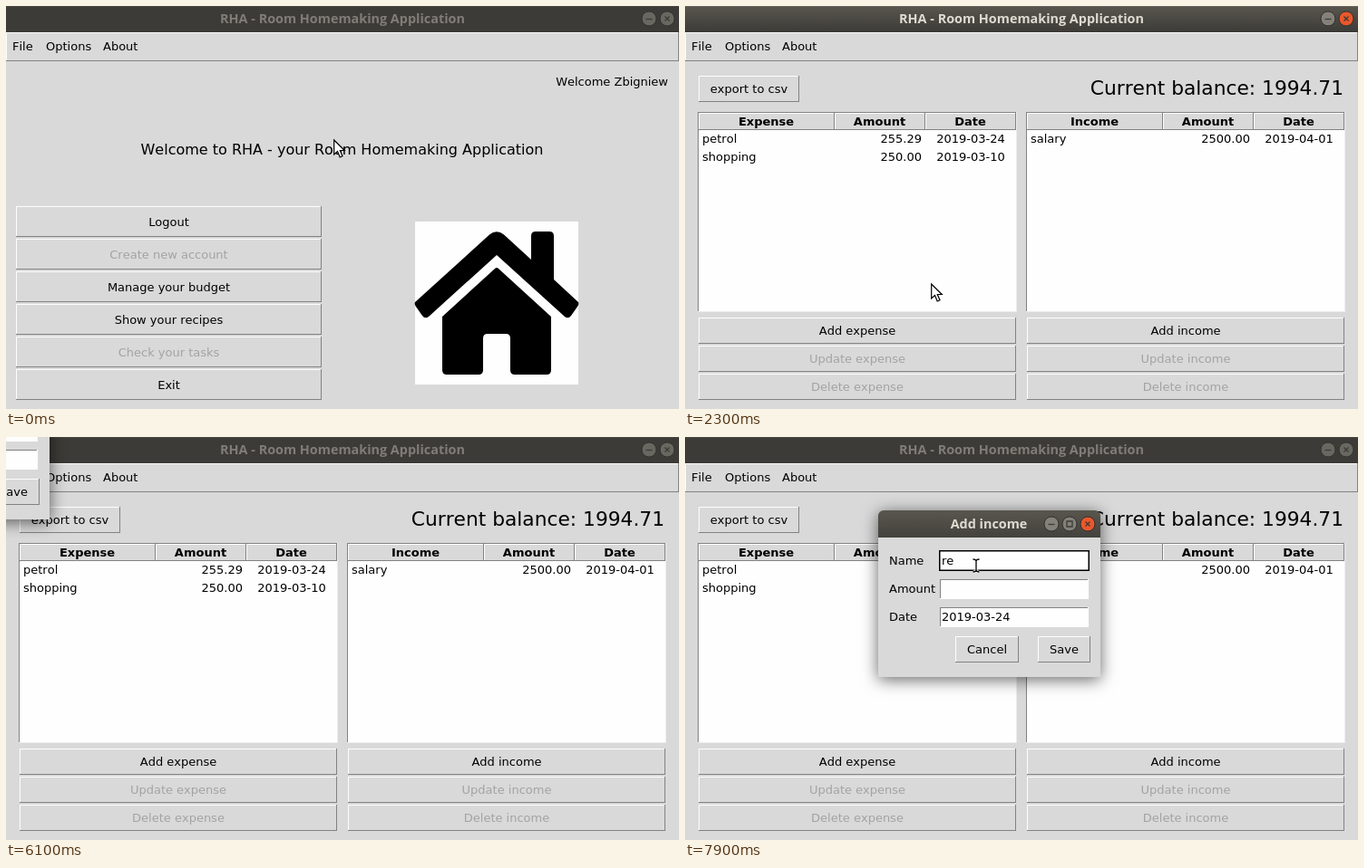
These frames come from a looping animation (742 by 445 pixels, 8 s). An HTML page:

```html
<!DOCTYPE html>
<html lang="en">
<head>
<meta charset="utf-8">
<title>RHA</title>
<style>
  html, body { margin: 0; width: 742px; height: 445px; overflow: hidden; background: #d9d9d9 }
  svg { display: block }
  text { font: 13px "DejaVu Sans", sans-serif; font-kerning: none; white-space: pre }
  .bold { font-weight: bold }
  .off { fill: #a3a3a3 }
  .lead { font-size: 16px }
  .big { font-size: 21.75px }
  .title { font: bold 14.4px "Open Sans", sans-serif }
  #dialog { filter: drop-shadow(0 3px 9px rgba(0, 0, 0, .6)) }
</style>
</head>
<body>
<svg id="stage" width="742" height="445" viewBox="0 0 742 445"></svg>
<script>
const NAME = 'RHA - Room Homemaking Application';
const BG = '#d9d9d9', DARK = '#828282', WHITE = '#fffeff';

const rect = (x, y, w, h, fill, extra = '') =>
  `<rect x="${x}" y="${y}" width="${w}" height="${h}" fill="${fill}" ${extra}/>`;

const text = (x, y, s, cls = '', anchor = 'start', extra = '') =>
  `<text x="${x}" y="${y}" class="${cls}" text-anchor="${anchor}" ${extra}>${s}</text>`;

// A box with one-pixel light and shade edges.
const bevel = (x, y, w, h, fill, light, shade, id = '') =>
  rect(x, y, w, h, shade) + rect(x, y, w - 1, h - 1, light) +
  rect(x + 1, y + 1, w - 2, h - 2, fill, id && `id="${id}"`);

const button = (x, y, w, h, label, { off = false, id = '' } = {}) =>
  bevel(x, y, w, h, BG, WHITE, DARK, id) +
  text(x + w / 2, y + Math.floor(h / 2) + 4.5, label, off ? 'off' : '', 'middle');

const entry = y => bevel(68, y, 164, 22, WHITE, DARK, WHITE);

function windowButton(x, y, kind, active) {
  const hot = active && kind === 'close';
  const glyph = {
    min: 'M-3.5 .5H3.5',
    max: 'M-3 -3H3V3H-3Z',
    close: 'M-2.5 -2.5L2.5 2.5M2.5 -2.5L-2.5 2.5'
  }[kind];
  return `<g transform="translate(${x} ${y})">
    <circle r="8" fill="${hot ? '#e9582c' : active ? '#83817a' : '#686760'}" stroke="#33322e"/>
    <path d="${glyph}" fill="none" stroke="#3c3b37" stroke-width="1.3"/></g>`;
}

const mainBar = active =>
  rect(0, 0, 742, 29, active ? 'url(#bar)' : '#3c3b37') +
  rect(0, 0, 742, 1, active ? '#66645c' : '#474641') +
  text(371, 19, NAME, 'title', 'middle', `fill="${active ? '#dfdbd2' : '#807d78'}"`) +
  windowButton(709, 14, 'min', active) + windowButton(729, 14, 'close', active);

function table(x, first, rows) {
  let out = bevel(x, 117, 352, 221, WHITE, DARK, '#ececec');
  let left = x + 1;
  [[150, first], [100, 'Amount'], [100, 'Date']].forEach(([w, label]) => {
    out += bevel(left, 118, w, 19, BG, WHITE, DARK) +
      text(left + w / 2 - .5, 132, label, 'bold', 'middle');
    left += w;
  });
  rows.forEach(([what, sum, date], i) => {
    const y = 151 + 20 * i;
    out += text(x + 5, y, what) + text(x + 247, y, sum, '', 'end') + text(x + 301, y, date, '', 'middle');
  });
  return out;
}

const actions = (x, kind) => ['Add', 'Update', 'Delete'].map((verb, i) =>
  button(x, 344 + 31 * i, 350, 29, `${verb} ${kind}`, { off: i > 0, id: i ? '' : `add-${kind}` })).join('');

const menuItems = [
  ['Logout', { id: 'logout' }], ['Create new account', { off: true }],
  ['Manage your budget', { id: 'budget' }], ['Show your recipes'],
  ['Check your tasks', { off: true }], ['Exit']
];

const house = `<g id="house">
  <path d="M451 327L533 252.5Q541 246 549 252.5L579 280V254Q579 249 584 249H599Q604 249 604 254V302L631 327
    Q632 329 630 332L623 342Q620 346 616 343L541 275L466 343Q462 346 459 342L452 332Q450 329 451 327Z"/>
  <path d="M539 290Q541 288 543 290L601 343V402Q601 407 596 407H561Q556 407 556 402V367Q556 362 551 362H531
    Q526 362 526 367V402Q526 407 521 407H486Q481 407 481 402V343Z"/></g>`;

const bag = `<g id="bag">
  <path d="M507 238H576Q585 240 580 249L564 273H518L502 249Q498 240 507 238Z"/>
  <path d="M518 283H564C597 302 631 342 631 382C631 407 614 418 594 418H488C468 418 451 407 451 382
    C451 342 485 302 518 283Z"/>
  <path d="M556 333C549 325 525 323 525 339C525 355 558 346 558 363C558 379 534 380 523 371
    M541 316V324M541 377V385" fill="none" stroke="${WHITE}" stroke-width="11" stroke-linecap="round"/>
  ${rect(551, 380, 80, 1, '#555')}</g>`;

const home = `<g id="home">
  ${text(730, 88, 'Welcome Zbigniew', '', 'end')}
  ${text(370.5, 164, 'Welcome to RHA - your Room Homemaking Application', 'lead', 'middle')}
  ${menuItems.map(([label, opt], i) => button(11, 221 + 36 * i, 337, 34, label, opt)).join('')}
  ${rect(451, 238, 180, 180, WHITE)}${house}${bag}</g>`;

const budgetView = `<g id="view">
  ${button(15, 77, 111, 29, 'export to csv')}
  ${text(726, 98, 'Current balance: 1994.71', 'big', 'end')}
  ${table(14, 'Expense', [['petrol', '255.29', '2019-03-24'], ['shopping', '250.00', '2019-03-10']])}
  ${table(376, 'Income', [['salary', '2500.00', '2019-04-01']])}
  ${actions(15, 'expense')}${actions(377, 'income')}</g>`;

const dialog = `<g id="dialog">
  ${rect(0, 0, 245, 40, 'url(#bar)', 'rx="6"')}${rect(0, 30, 245, 154, BG)}
  ${text(122, 20, 'Add income', 'title', 'middle', 'fill="#dfdbd2"')}
  ${['min', 'max', 'close'].map((kind, i) => windowButton(191 + 20 * i, 15, kind, true)).join('')}
  ${['Name', 'Amount', 'Date'].map((s, i) => text(12, 60 + 31 * i, s) + entry(45 + 31 * i)).join('')}
  ${text(70, 122, '2019-03-24')}
  <g id="focus">${rect(67, 44, 166, 23, '#000')}${rect(68.5, 45.5, 163, 20, WHITE)}</g>
  ${rect(69, 47, 2, 17, '#000', 'id="caret"')}
  ${text(70, 60, 're', '', 'start', 'id="typed"')}
  ${button(85, 139, 70, 29, 'Cancel')}${button(176, 139, 58, 29, 'Save')}</g>`;

const cursors = `
  <path id="arrow" d="M.7 1V17L4.5 13.5L7.2 20L10 18.8L7.3 12.5H12.3Z" fill="#fff" stroke="#000" stroke-width="1.2"/>
  <path id="hand" d="M-5 -4Q-5 -7 -2.5 -6Q-1 -8 1 -6Q3 -7 4 -5Q6.5 -5 6.5 -2V2L4.5 7H-3.5V4L-6.5 1Q-7 -2 -5 -1Z
    M-2.3 -5.5V-2M1 -5.5V-2M4 -4.5V-2" fill="#fff" stroke="#000" stroke-width="1.2"/>
  <g id="beam" fill="none">
    <path d="M-3.5 -7Q0 -7 0 -5V5Q0 7 -3.5 7M3.5 -7Q0 -7 0 -5V5Q0 7 3.5 7" stroke="#fff" stroke-width="3"/>
    <path d="M-3.5 -7Q0 -7 0 -5V5Q0 7 -3.5 7M3.5 -7Q0 -7 0 -5V5Q0 7 3.5 7" stroke="#000" stroke-width="1.3"/></g>`;

const $ = id => document.getElementById(id);
$('stage').innerHTML = `
  <defs><linearGradient id="bar" x2="0" y2="1">
    <stop stop-color="#59564e"/><stop offset="1" stop-color="#3c3b37"/></linearGradient></defs>
  ${rect(0, 0, 742, 445, BG)}${home}${budgetView}
  ${bevel(0, 29, 742, 32, BG, WHITE, DARK)}
  ${text(7, 49, 'File')}${text(44, 49, 'Options')}${text(107, 49, 'About')}
  ${mainBar(false)}<g id="active">${mainBar(true)}</g>${dialog}${cursors}`;

// Paths as [time, x, y].
const pointer = [
  [700, 361, 147], [900, 355, 157], [1000, 355, 157], [1800, 271, 306], [2600, 271, 306],
  [3200, 108, 162], [3500, 108, 162], [4100, 140, 338], [4400, 133, 350], [5000, 133, 350],
  [5200, 82, 211], [6600, 351, 100], [6700, 351, 100], [7000, 322, 147], [7200, 322, 147], [7300, 321, 142]
];
const drag = [[6100, -197, -93], [6500, 212, 80], [6600, 213, 81]];

function along(path, t) {
  const i = path.findIndex(p => p[0] > t);
  if (i < 1) return (i ? path[path.length - 1] : path[0]).slice(1);
  const [a, b] = [path[i - 1], path[i]];
  const k = (t - a[0]) / (b[0] - a[0]);
  return [1, 2].map(j => Math.round(a[j] + (b[j] - a[j]) * k));
}

const show = (id, on) => { $(id).style.display = on ? '' : 'none'; };
const move = (id, [x, y]) => $(id).setAttribute('transform', `translate(${x} ${y})`);

function draw(t) {
  const [x, y] = along(pointer, t), [dx, dy] = along(drag, t);
  const isHome = t < 2300;
  const within = (l, top, r, b) => x > l && x < r && y > top && y < b;
  const hover = {
    logout: isHome && within(11, 221, 348, 255),
    budget: isHome && within(11, 293, 348, 327),
    'add-expense': !isHome && t < 5400 && within(15, 344, 365, 373)
  };
  for (const id in hover) $(id).setAttribute('fill', hover[id] ? '#ececec' : BG);

  show('home', isHome);
  show('view', !isHome);
  show('house', !hover.budget);
  show('bag', hover.budget);
  $('active').style.opacity = t < 2200 || t >= 4900 ? 0 : t < 2300 || t >= 4800 ? .5 : 1;

  show('dialog', t >= 6100);
  move('dialog', [dx, dy]);
  show('focus', t >= 7300);
  show('caret', t >= 7300 && t < 7600);
  show('typed', t >= 7900);

  show('arrow', t < 5400 || (t >= 6600 && t < 7000));
  move('arrow', [x, y]);
  show('hand', t >= 6100 && t < 6600);
  move('hand', [dx + 138, dy + 23]);
  show('beam', t >= 7000);
  move('beam', [x, y]);
}

function tick() {
  draw(Math.floor(performance.now() % 8000 / 100) * 100);
  requestAnimationFrame(tick);
}
tick();
</script>
</body>
</html>
```
